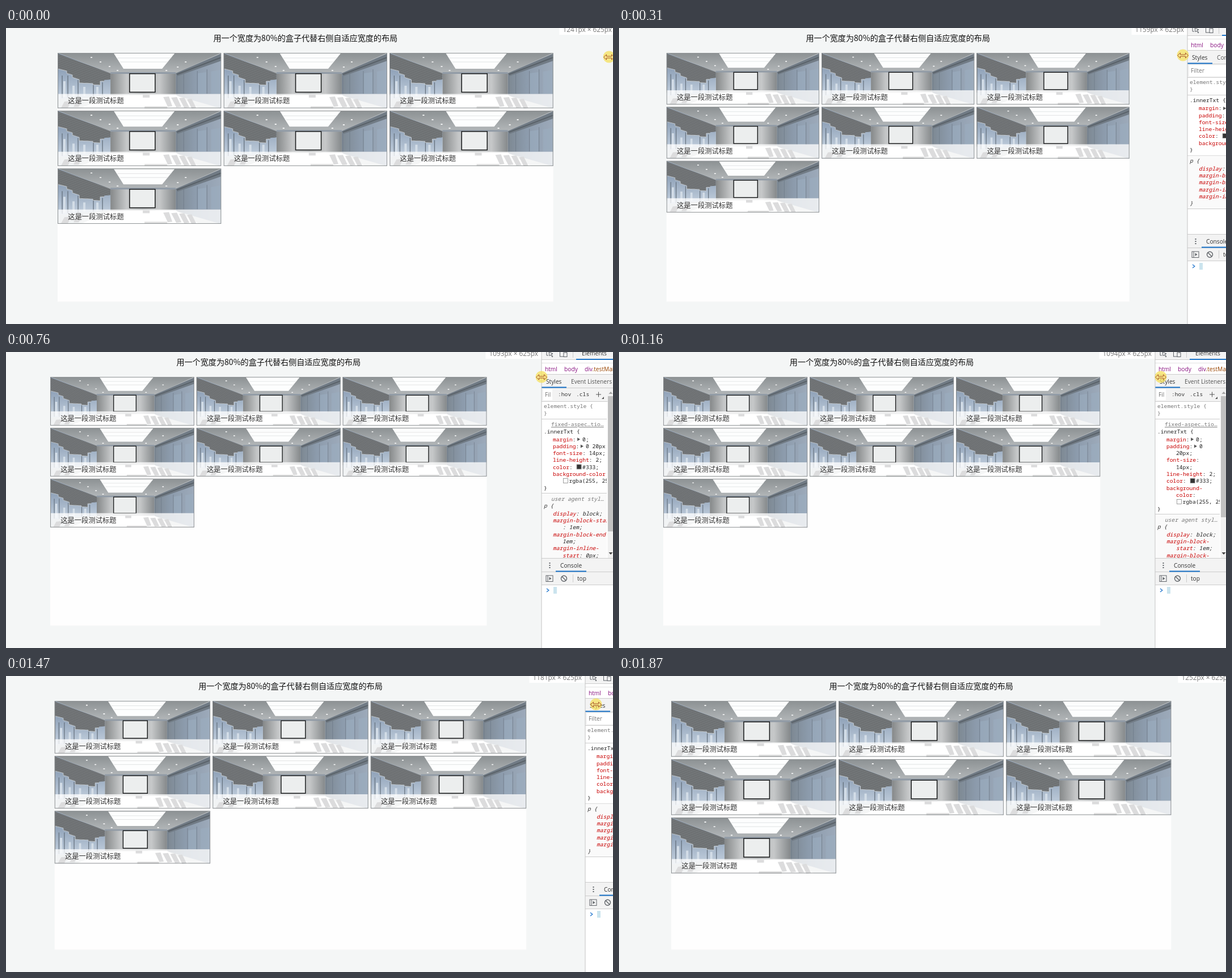
Write an HTML page that moves like this. It is 1070 px wide and 523 px high and loops after 2.24 s.

```html
<!DOCTYPE html>
<html lang="zh-CN">
<head>
<meta charset="utf-8">
<title>自适应宽度布局</title>
<style>
  html, body { margin: 0; width: 100%; height: 100%; overflow: hidden; background: #f4f6f6; }
  svg { display: block; }
  .page { font-family: "Noto Sans CJK SC", "Noto Sans CJK", sans-serif; }
  .ui { font: 10.2px "Open Sans", sans-serif; }
  .code { font: 9.67px "Noto Sans Mono", monospace; white-space: pre; }
</style>
</head>
<body>
<svg id="stage" width="1070" height="523" viewBox="0 0 1070 523">
  <defs>
    <linearGradient id="ceiling" x1="0" y1="0" x2="0" y2="1">
      <stop offset="0" stop-color="#8c9193"/><stop offset="1" stop-color="#b3b7b9"/>
    </linearGradient>
    <linearGradient id="back">
      <stop offset="0" stop-color="#858889"/><stop offset=".25" stop-color="#c6c8c9"/>
      <stop offset=".5" stop-color="#b4b7b8"/><stop offset=".75" stop-color="#c6c8c9"/>
      <stop offset="1" stop-color="#85898b"/>
    </linearGradient>
    <linearGradient id="glass" x1="0" y1="0" x2="0" y2="1">
      <stop offset=".4" stop-color="#93a5bb"/><stop offset="1" stop-color="#c3d0de"/>
    </linearGradient>
    <linearGradient id="side">
      <stop offset="0" stop-color="#7d8892"/><stop offset=".4" stop-color="#8c9bac"/>
      <stop offset="1" stop-color="#9daaba"/>
    </linearGradient>
    <pattern id="slats" width="4" height="3" patternUnits="userSpaceOnUse" patternTransform="rotate(18)">
      <rect width="4" height="3" fill="#6a6d6f"/><path d="M0 .5H4" stroke="#808486" stroke-width=".8"/>
    </pattern>
    <symbol id="room" viewBox="0 0 288 97.6" preserveAspectRatio="none">
      <rect width="288" height="98" fill="#d5d7d8"/>
      <path d="M0 0H288L208 36H93Z" fill="url(#ceiling)"/>
      <path d="M93 36H208V78H93Z" fill="url(#back)"/>
      <path d="M93 34H208V37H93Z" fill="#919ba6"/>
      <path d="M99 1H206L184 28H116Z" fill="#fdfefe"/>
      <path d="M105 9H200M110 16H194" stroke="#d3d6d7" stroke-width=".7"/>
      <path d="M0 0L93 36V74L0 82Z" fill="url(#glass)"/>
      <path d="M8 40V80M18 40V80M36 48V78M63 55V76M79 52V75" stroke="#64707d" stroke-width="1.3"/>
      <path d="M12 50V78M28 58V77M47 60V76M70 60V75" stroke="#d3dde7" stroke-width="4"/>
      <path d="M0 1L93 36V47L82 48V50H75V57L62 56V54L38 53V47L26 43V39L16 36V32L0 28Z" fill="url(#slats)"/>
      <path d="M0 28L16 32V36L26 39V43L38 47V53L62 54V56L75 57V50H82" fill="none" stroke="#d2d6d9" stroke-width=".8"/>
      <path d="M.5 0V75" stroke="#34383b"/>
      <path d="M208 36L288 1V98L208 75Z" fill="url(#side)"/>
      <path d="M208 36L288 1V14L211 41Z" fill="#717b85"/>
      <path d="M210 38L288 8" stroke="#596168" stroke-width="2"/>
      <path d="M247 36L262 34V72H247ZM270 33L288 30V72H270Z" fill="#9cadc0" opacity=".6"/>
      <path d="M210 40V74M222 37V72M246 32V72M263 29V72" stroke="#6e7a88" stroke-width=".8"/>
      <path d="M93 75L208 74L250 98H40Z" fill="#fff"/>
      <path d="M0 82L60 77L35 98H0Z" fill="#c5cad0"/>
      <path d="M186 78l10-1 6 17-8 1ZM200 79l10-1 8 17-9 1ZM214 80l9-1 9 17-9 1ZM228 82l8-1 8 16-8 1ZM150 74h12v5h-12ZM12 86l12-1-6 12h-12ZM35 82l10-1-8 14h-9Z" fill="#666a6c"/>
      <path d="M153 94H193V98H153Z" fill="#777"/>
      <rect x="126.7" y="36.7" width="45" height="32.6" fill="#eceeee" stroke="#17191a" stroke-width="1.5"/>
      <path d="M74 16h3M90 24h3M104 31h3M224 16h3M210 25h3M190 31h3M58 8h3" stroke="#fff" stroke-width="1.6"/>
    </symbol>
  </defs>
  <g id="scene"></g>
</svg>
<script>
const LOOP = 2240;
const SCALE = 0.88, ORIGIN = -18.2, CHAR = 5.8;

// [start ms, viewport width, pointer x, pointer y]
const STEPS = [
  [0, 1241, 1063, 51], [80, 1218, 1045, 51], [160, 1193, 1025, 51], [240, 1176, 1009, 50],
  [310, 1159, 994, 48], [380, 1142, 979, 46], [460, 1126, 965, 45], [540, 1107, 954, 44],
  [620, 1101, 948, 44], [690, 1096, 945, 44], [760, 1093, 944, 44], [930, 1093, 944, 44],
  [1160, 1094, 955, 44], [1230, 1109, 972, 45], [1310, 1131, 994, 47], [1390, 1156, 1017, 49],
  [1470, 1181, 1040, 50], [1550, 1207, 1062, 51], [1630, 1231, 1079, 51], [1710, 1241, 1090, 51],
  [1790, 1248, 1100, 51], [1870, 1252, 1110, 51]
];

const rect = (x, y, w, h, fill, more = '') =>
  `<rect x="${x}" y="${y}" width="${w}" height="${h}" fill="${fill}" ${more}/>`;
const text = (x, y, str, cls, fill, more = '') =>
  `<text x="${x}" y="${y}" class="${cls}" fill="${fill}" ${more}>${str}</text>`;
const path = (d, stroke, more = 'fill="none"') => `<path d="${d}" stroke="${stroke}" ${more}/>`;

function card(x, y, w, h) {
  return `<use href="#room" x="${x}" y="${y}" width="${w}" height="${h}"/>`
    + rect(x, y + h - 25.2, w, 24.6, '#fff', 'fill-opacity=".77"')
    + rect(x + .5, y + .5, w - 1, h - 1, 'none', 'stroke="#8f9395"')
    + text(x + 18.2, y + h - 8.4, '这是一段测试标题', 'page', '#333', 'font-size="12.32"');
}

function page(view) {
  const left = ORIGIN + view * SCALE * .1, width = view * SCALE * .8;
  const w = width * .33, h = w * .339, gap = width * .005;
  let out = rect(left, 44, width, 439.5, '#fefefe')
    + text(left + width / 2, 23, '用一个宽度为80%的盒子代替右侧自适应宽度的布局', 'page', '#111',
      'font-size="14.1" text-anchor="middle"');
  for (let i = 0; i < 7; i++) {
    out += card(left + i % 3 * (w + gap), 44 + Math.floor(i / 3) * (h + gap), w, h);
  }
  return out;
}

function sizeLabel(edge, view) {
  return rect(edge - 98.5, 0, 98.5, 12, '#fff')
    + text(edge - 92.5, 6.5, `${view}px × 625px`, 'ui', '#777', 'style="font-size:11.8px"');
}

// One declaration line; a leading space marks a wrapped line.
function declaration(edge, y, line, slant) {
  let x = edge + (line[0] === ' ' ? 37 : 20), out = '';
  const body = line.trim(), cut = body.indexOf(':');
  const plain = cut < 0 && /[;(]/.test(body);
  const name = plain ? '' : cut < 0 ? body : body.slice(0, cut);
  let value = plain ? body : cut < 0 ? '' : body.slice(cut);
  if (name) out += text(x, y + 3.3, name, 'code', '#c80000', slant);
  x += name.length * CHAR;
  if (value[0] === ':') {
    out += text(x, y + 3.3, ':', 'code', '#222', slant);
    value = value.slice(1);
    x += CHAR;
  }
  if (value[0] === ' ') { value = value.slice(1); x += CHAR; }
  const mark = value[0];
  if ('▶■□'.includes(mark || '?')) {
    out += mark === '▶'
      ? path(`M${x + 2.5} ${y - 3}l5 3l-5 3z`, 'none', 'fill="#555"')
      : rect(x + 1.5, y - 4.5, 8, 8, mark === '■' ? '#333' : '#fff', 'stroke="#888" stroke-width=".8"');
    value = value.slice(1);
    x += 11.5;
  }
  return out + text(x, y + 3.3, value, 'code', '#222', slant);
}

function styleRules(tight, rewrapped, longRule) {
  const inner = ['margin:▶0;', ...(rewrapped
    ? ['padding:▶0', ' 20px;', 'font-size:', ' 14px;']
    : ['padding:▶0 20px;', 'font-size: 14px;']),
    'line-height: 2;', 'color: ■#333;'];
  if (rewrapped) inner.push('background-', ' color:', ' □rgba(255, 255,');
  else if (tight) inner.push('background-color', ' □rgba(255, 255,');
  else inner.push('background-color: □rgba(');
  if (longRule) inner.push('');
  let p = ['display: block;'];
  if (rewrapped) p.push('margin-block-', ' start: 1em;', 'margin-block-');
  else if (tight) p.push('margin-block-start', ' : 1em;', 'margin-block-end:', ' 1em;', 'margin-inline-', ' start: 0px;');
  else p.push('margin-block-start: 1em;', 'margin-block-end: 1em;', 'margin-inline-start: 0px;', 'margin-inline-end: 0px;');
  return [
    { head: 'element.style {', color: '#777', lines: [] },
    { head: '.innerTxt {', color: '#222', lines: inner, link: tight && 'fixed-aspec…tio…' },
    { head: 'p {', color: '#333', lines: p, link: tight && 'user agent styl…', agent: true }
  ];
}

function stylesPane(edge, tight, rewrapped, longRule) {
  let y = 95.3, out = '';
  for (const rule of styleRules(tight, rewrapped, longRule)) {
    const slant = rule.agent ? 'font-style="italic" style="font-style:italic"' : '';
    if (rule.agent) {
      const rows = rule.lines.length + (rule.link ? 1 : 0);
      out += rect(edge + 1, y - 9, 200, rows * 12.3 + 32, '#fafafa');
    }
    if (rule.link) {
      out += text(edge + 17, y + 3.3, rule.link, 'code', '#777', slant || 'text-decoration="underline"');
      y += 12.3;
    }
    out += text(edge + 4, y + 3.3, rule.head, 'code', rule.color, slant);
    y += 13.8;
    for (const line of rule.lines) {
      out += declaration(edge, y, line, slant);
      y += 12.3;
    }
    out += text(edge + 4, y + 3.3, '}', 'code', rule.color, slant);
    out += rect(edge, Math.round(y + 9), 200, 1, '#ccc');
    y += 19;
  }
  if (!tight) {
    const top = Math.round(y + 3.5);
    out += rect(edge + 78.5, top + .5, 150, 90, '#f9cc9d', 'stroke="#333" stroke-dasharray="3 2"')
      + text(edge + 89, top + 15, 'margin', 'ui', '#222')
      + rect(edge + 93.5, top + 20.5, 150, 60, '#fddc9b', 'stroke="#111"');
  }
  return out;
}

function scrollbar(rewrapped) {
  return rect(1059, 88, 2, 276, '#fff') + rect(1060.5, 64, 10, 300, '#f1f1f1')
    + rect(1061, 78, 9, rewrapped ? 214 : 239, '#c1c1c1')
    + path('M1062.5 74l3.5-4l3.5 4z', 'none', 'fill="#a3a3a3"')
    + path('M1062.5 354l3.5 4l3.5-4z', 'none', 'fill="#444"');
}

function topBars(edge, tight) {
  const at = n => edge + n, icon = '#5f6368';
  let out = rect(edge, 0, 200, 13, '#f3f3f3') + rect(edge, 13, 200, 1, '#ccc')
    + path(`M${at(18)} -3H${at(9)}V6h3M${at(13)} 0l7 3-3 1 3 4-1 1-3-4-2 2z`, icon)
    + rect(at(32.5), -4, 11, 12, 'none', `stroke="${icon}"`)
    + rect(at(39), 1, 6, 7.5, '#f3f3f3', `stroke="${icon}"`)
    + rect(at(55), 0, 1, 10, '#ccc')
    + text(at(71), 6.3, 'Elements', 'ui', '#333') + rect(at(61), 12, 80, 2, '#1a73c8')
    + rect(edge, 19, 200, 1, '#e2e2e2');
  [[6, 'html'], [40, 'body'], [76, 'div.testMain']].forEach(([x, s]) => {
    const tag = s.startsWith('div')
      ? 'div<tspan fill="#994500">.testMain</tspan>' : s;
    out += text(at(x), 33.5, tag, 'ui', '#881280');
  });
  out += rect(edge, 39, 200, 24, '#f3f3f3') + rect(edge, 39, 200, 1, '#ccc') + rect(edge, 63, 200, 1, '#ccc')
    + text(at(8), 55.5, 'Styles', 'ui', '#333') + rect(edge, 61.5, 44, 2, '#1a73c8')
    + text(at(52), 55.5, tight ? 'Event Listeners' : 'Computed', 'ui', '#555')
    + rect(edge, 64, 200, 23, '#f3f3f3') + rect(at(3), 66, tight ? 16 : 200, 19, '#fff')
    + rect(edge, 87, 200, 1, '#ccc')
    + text(at(6), 79, tight ? 'Fil' : 'Filter', 'ui', '#777');
  if (tight) {
    out += text(at(29), 78.3, ':hov', 'code', '#333') + text(at(61), 78.3, '.cls', 'code', '#333')
      + path(`M${at(96)} 75h9M${at(100.5)} 70.5v9`, '#555')
      + path(`M${at(110)} 79v4h-4z`, 'none', 'fill="#555"');
  }
  return out;
}

function consolePane(edge) {
  const at = n => edge + n, icon = '#5f6368';
  let out = rect(edge, 364, 200, 159, '#fff') + rect(edge, 364, 200, 48, '#f3f3f3');
  [364, 388, 411].forEach(y => { out += rect(edge, y, 200, 1, '#ccc'); });
  [373, 377, 381].forEach(y => { out += rect(at(13.5), y - 1, 2, 2, icon); });
  return out + text(at(33), 380.5, 'Console', 'ui', '#333') + rect(at(25), 386.5, 54, 2, '#1a73c8')
    + rect(at(8), 395, 12, 10.5, 'none', `stroke="${icon}"`) + path(`M${at(11)} 395v10.5`, icon)
    + path(`M${at(13.5)} 397.5l4 2.7l-4 2.7z`, 'none', `fill="${icon}"`)
    + `<circle cx="${at(39.5)}" cy="400.3" r="5" fill="none" stroke="${icon}" stroke-width="1.4"/>`
    + path(`M${at(36)} 396.8l7 7`, icon, 'stroke-width="1.4"')
    + rect(at(55), 393, 1, 14, '#ccc') + text(at(63), 404, 'top', 'ui', '#333')
    + path(`M${at(9)} 418l3.8 3l-3.8 3`, '#2a7bd0', 'fill="none" stroke-width="1.4"')
    + rect(at(21), 415, 6, 12, '#cbe4ee');
}

function devtools(edge, view, time) {
  if (edge >= 1070) return '';
  const tight = view < 1112, rewrapped = tight && time >= 930;
  return rect(edge, 0, 200, 523, '#fff')
    + stylesPane(edge, tight, rewrapped, view > 1187)
    + topBars(edge, tight) + (tight ? scrollbar(rewrapped) : '')
    + consolePane(edge) + rect(edge - .5, 0, 1, 523, '#c4c4c4');
}

function pointer(x, y) {
  return `<g transform="translate(${x} ${y})"><circle r="10.5" fill="#f6e05c" fill-opacity=".75"/>`
    + path('M-9.5 .5l5-4.5v3h9v-3l5 4.5l-5 4.5v-3h-9v3z', '#a8552a', 'fill="#f8e890" fill-opacity=".6"') + '</g>';
}

const scene = document.getElementById('scene');
const start = performance.now();
let shown = null;

function frame() {
  const time = (performance.now() - start) % LOOP;
  const step = STEPS.findLast(s => s[0] <= time) || STEPS[0];
  if (step !== shown) {
    shown = step;
    const [at, view, x, y] = step, edge = Math.round(ORIGIN + view * SCALE);
    scene.innerHTML = rect(0, 0, 1070, 523, '#f4f6f6') + page(view) + sizeLabel(edge, view)
      + devtools(edge, view, at) + pointer(x, y);
  }
  requestAnimationFrame(frame);
}
frame();
</script>
</body>
</html>
```
